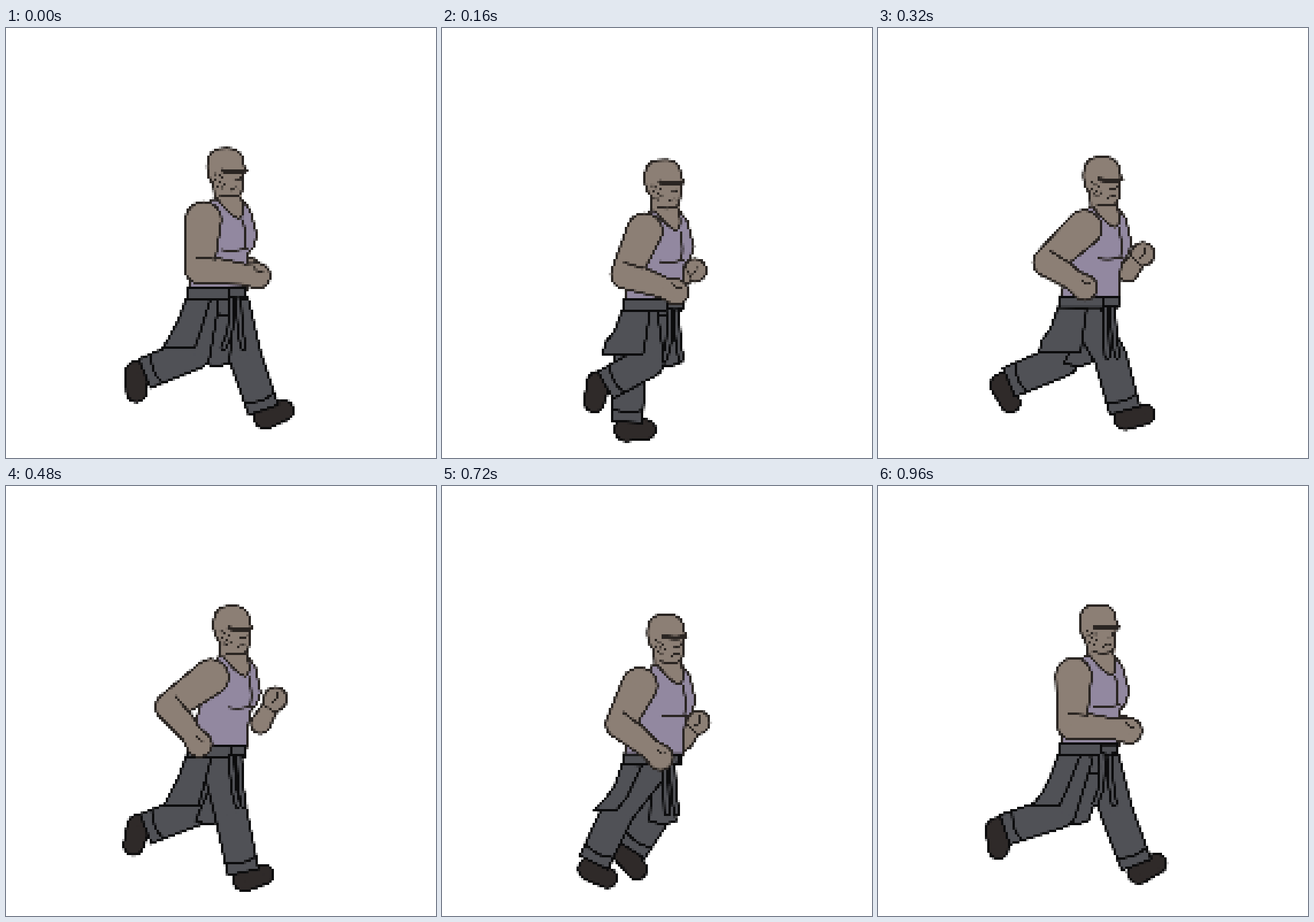
Write an HTML page with a canvas that moves like this. It is 748 px wide and 748 px high and loops after 1040 ms.

```html
<!DOCTYPE html>
<html lang="en">
<head>
<meta charset="utf-8">
<title>Running man</title>
<style>
  html, body { margin: 0; width: 100%; height: 100%; overflow: hidden; background: #fff; }
  canvas { display: block; width: 748px; height: 748px; image-rendering: pixelated; }
</style>
</head>
<body>
<canvas id="stage" width="748" height="748"></canvas>
<script>
const SKIN = '#8c7f75', SHIRT = '#9288a0', CLOTH = '#505156', SHOE = '#2f2a29';
const INK = '#2a2522', BLACK = '#0c0c0d';
const STEP = 80, STEPS = 13, PIXEL = 4, GRID = 188, EDGE = 2, LINE = 4;

const screen = document.getElementById('stage').getContext('2d');
const layer = size => {
  const c = document.createElement('canvas');
  c.width = c.height = size;
  return c.getContext('2d');
};
const g = layer(GRID * PIXEL), coarse = layer(GRID);

// Foot keys: step, centre x, centre y, toe angle in degrees, knee bend.
const NEAR_FOOT = [
  [0, 227, 615, 92, 43], [2, 268, 633, 102, 46], [4, 446, 675, -10, 12],
  [6, 430, 680, -15, 2], [7, 383, 694, -8, -20], [8, 328, 698, 0, -25],
  [10, 214, 648, 55, 4], [11, 181, 628, 75, 28], [12, 208, 613, 87, 44]
];
const FAR_FOOT = [
  [0, 466, 671, -20, -5], [2, 336, 698, 0, -30], [4, 222, 635, 65, 33],
  [5, 193, 620, 85, 38], [6, 226, 607, 105, 41], [7, 278, 660, 62, 15],
  [8, 266, 640, 95, 40], [10, 390, 665, 10, 13], [12, 468, 664, -25, -5]
];

function track(keys, step) {
  const i = Math.max(1, keys.findIndex(k => k[0] >= step));
  const a = keys[i - 1], b = keys[i], t = (step - a[0]) / (b[0] - a[0]);
  return a.map((v, n) => v + (b[n] - v) * t).slice(1);
}

const add = (p, x, y) => [p[0] + x, p[1] + y];
const mid = (p, q, t) => [p[0] + (q[0] - p[0]) * t, p[1] + (q[1] - p[1]) * t];
function unit(p, q) {
  const x = q[0] - p[0], y = q[1] - p[1], d = Math.hypot(x, y) || 1;
  return [x / d, y / d];
}

function path(points, smooth) {
  g.beginPath();
  g.moveTo(...points[0]);
  points.slice(1).forEach((p, i, rest) => {
    const next = rest[i + 1];
    if (smooth && next) g.quadraticCurveTo(...p, ...mid(p, next, .5));
    else g.lineTo(...p);
  });
}
function line(points, ink = INK, width = LINE) {
  path(points, true);
  g.strokeStyle = ink;
  g.lineWidth = width;
  g.stroke();
}
function shape(points, fill, ink) {
  path(points);
  g.closePath();
  g.fillStyle = fill;
  g.fill();
  if (!ink) return;
  g.strokeStyle = ink;
  g.lineWidth = LINE;
  g.stroke();
}

// Outlined chain of tapered segments with round joints.
function limb(joints, radii, fill, ink, flatEnd) {
  const last = joints.length - 1;
  for (const [color, pad] of [[ink, LINE / 2], [fill, -LINE / 2]]) {
    g.fillStyle = color;
    joints.forEach((p, i) => {
      const r = radii[i] + pad;
      if (i < last || !flatEnd) {
        g.beginPath();
        g.arc(...p, r, 0, 7);
        g.fill();
      }
      if (!i) return;
      const q = joints[i - 1], s = radii[i - 1] + pad, [x, y] = unit(q, p);
      const e = i === last && flatEnd ? add(p, x * pad, y * pad) : p;
      path([add(q, -y * s, x * s), add(e, -y * r, x * r), add(e, y * r, -x * r), add(q, y * s, -x * s)]);
      g.fill();
    });
  }
}

function leg(hip, [x, y, angle, bend]) {
  const a = angle * Math.PI / 180, tx = Math.cos(a), ty = Math.sin(a);
  const foot = [x, y];
  limb([add(foot, -16 * tx, -16 * ty), add(foot, 18 * tx, 18 * ty)], [20, 17], SHOE, BLACK);
  const ankle = add(foot, -15 * tx + 13 * ty, -15 * ty - 13 * tx);
  const [ux, uy] = unit(hip, ankle);
  const knee = add(mid(hip, ankle, .47), uy * bend, -ux * bend);
  limb([hip, knee, ankle], [28, 28, 27], CLOTH, BLACK, true);
  const [sx, sy] = unit(knee, ankle);
  const cuff = add(ankle, -22 * sx, -22 * sy);
  line([add(cuff, -sy * 26, sx * 26), add(cuff, sx * 8, sy * 8), add(cuff, sy * 26, -sx * 26)], BLACK);
}

function arm(shoulder, elbow, fist, radii) {
  const [x, y] = unit(elbow, fist);
  const wrist = add(fist, -24 * x, -24 * y);
  limb([shoulder, elbow, wrist, fist], radii, SKIN, INK);
  line([add(elbow, y * 19 - x * 8, -x * 19 - y * 8), add(elbow, y * 20 + x * 26, -x * 20 + y * 26)]);
  line([add(fist, -6, -14), add(fist, 0, -6), add(fist, 9, -7)], INK, 3);
}

function farArm(elbow, fist) {
  const wrist = mid(elbow, fist, .6);
  limb([elbow, wrist, fist], [17, 14, 20], SKIN, INK);
  const [x, y] = unit(elbow, fist);
  line([add(wrist, -y * 14, x * 14), add(wrist, y * 14, -x * 14)], INK, 3);
  line([add(fist, 2, -12), add(fist, 5, 0), add(fist, -6, 6)], INK, 3);
}

const SHIRT_EDGE = [[358, 300], [410, 300], [424, 318], [436, 362], [430, 383], [420, 395],
  [418, 425], [418, 458], [316, 458], [325, 420], [345, 330]];
const SKULL = [[362, 300], [362, 275], [354, 266], [349, 248], [351, 226], [362, 213], [380, 211],
  [399, 212], [411, 224], [413, 242], [417, 247], [412, 256], [411, 294], [385, 296], [373, 293]];
const COLLAR = [[364, 296], [374, 308], [388, 324], [406, 336], [413, 322], [408, 294]];

function head() {
  shape([[362, 284], ...COLLAR], SKIN);
  line(COLLAR);
  shape(SKULL, SKIN);
  line(SKULL);
  line([[377, 250], [396, 253], [416, 250]], INK, 8);
  line([[407, 261], [408, 267], [397, 267]], INK, 3);
  line([[391, 284], [396, 279], [405, 280]], INK, 3);
  g.fillStyle = INK;
  for (let i = 0; i < 8; i++) g.fillRect(361 + i * 7 % 19, 254 + i * 3.4, PIXEL, PIXEL);
}

function figure(step) {
  const phase = step / STEPS * 2 * Math.PI, c = Math.cos(phase), s = Math.sin(phase), s2 = Math.sin(2 * phase);
  const lean = 5.5 - 5.5 * c;
  const bob = 6 - 10 * Math.cos(2 * phase + .58) + 4.5 * s;
  const waist = 454 + bob, hem = 554 + bob / 2;

  leg([370 + 25 * c, waist + 30], track(FAR_FOOT, step));

  const tail = 366 + 28 * s2;
  shape([[365, 500], [tail - 24, 582], [tail, 589], [tail + 22, 582], [395, 500]], CLOTH, BLACK);

  const farFist = [445 - 22 * c + 8 * s, 398 + 24 * c - 10 * s + bob];
  farArm(add(farFist, -26, 24 - 20 * c), farFist);

  leg([355 - 14 * c, waist + 30], track(NEAR_FOOT, step));

  // Jacket tied round the waist.
  shape([[313, waist + 18], [300, waist + 55], [285, hem - 18], [272 + 8 * s, hem + 4],
    [328 + 26 * s, hem + 3], [338 + 18 * s, waist + 75], [355 + 8 * s, waist + 20]], CLOTH, BLACK);

  // Shirt leans from the fixed waist.
  shape(SHIRT_EDGE.map(([x, y]) => [x + lean * (455 - y) / 155, y + bob]), SHIRT, INK);
  shape([[315, waist], [417, waist], [417, waist + 19], [315, waist + 19]], CLOTH, BLACK);
  const knot = [402 + 4 * s, waist + 9];
  for (const [top, end] of [[2, 10], [-11, -12 - 12 * c]]) {
    const sleeve = [add(knot, top, 10), add(knot, top + 2, 60), add(knot, end, 94)];
    line(sleeve, BLACK, 13);
    line(sleeve, CLOTH, 5);
  }
  shape([add(knot, -13, -8), add(knot, 14, -8), add(knot, 14, 6), add(knot, 0, 9), add(knot, -13, 6)], CLOTH, BLACK);

  g.save();
  g.translate(lean, bob);
  line([[412, 336], [416, 360], [414, 385]]);
  line([[376, 388], [392, 390], [418, 386]]);
  head();
  g.restore();

  arm([343 + 8 * s + lean, 335 + bob],
    [311 + 25 * c - 8 * s, 404 + 17 * c - 4 * s + bob],
    [387 + 50 * c - 11 * s, 445 - 12 * c - 6 * s + 8 * s2 + bob], [31, 25, 18, 22]);
}

function draw(step) {
  g.setTransform(1, 0, 0, 1, EDGE, EDGE);
  g.fillStyle = '#fff';
  g.fillRect(-EDGE, -EDGE, GRID * PIXEL, GRID * PIXEL);
  g.lineJoin = g.lineCap = 'round';
  figure(step);
  // Reduce to a coarse grid for hard square pixels.
  coarse.imageSmoothingEnabled = screen.imageSmoothingEnabled = false;
  coarse.drawImage(g.canvas, 0, 0, GRID, GRID);
  screen.drawImage(coarse.canvas, -EDGE, -EDGE, GRID * PIXEL, GRID * PIXEL);
}

const start = performance.now();
let shown = -1;
function tick() {
  const step = Math.floor((performance.now() - start) / STEP) % STEPS;
  if (step !== shown) draw(shown = step);
  requestAnimationFrame(tick);
}
tick();
</script>
</body>
</html>
```
